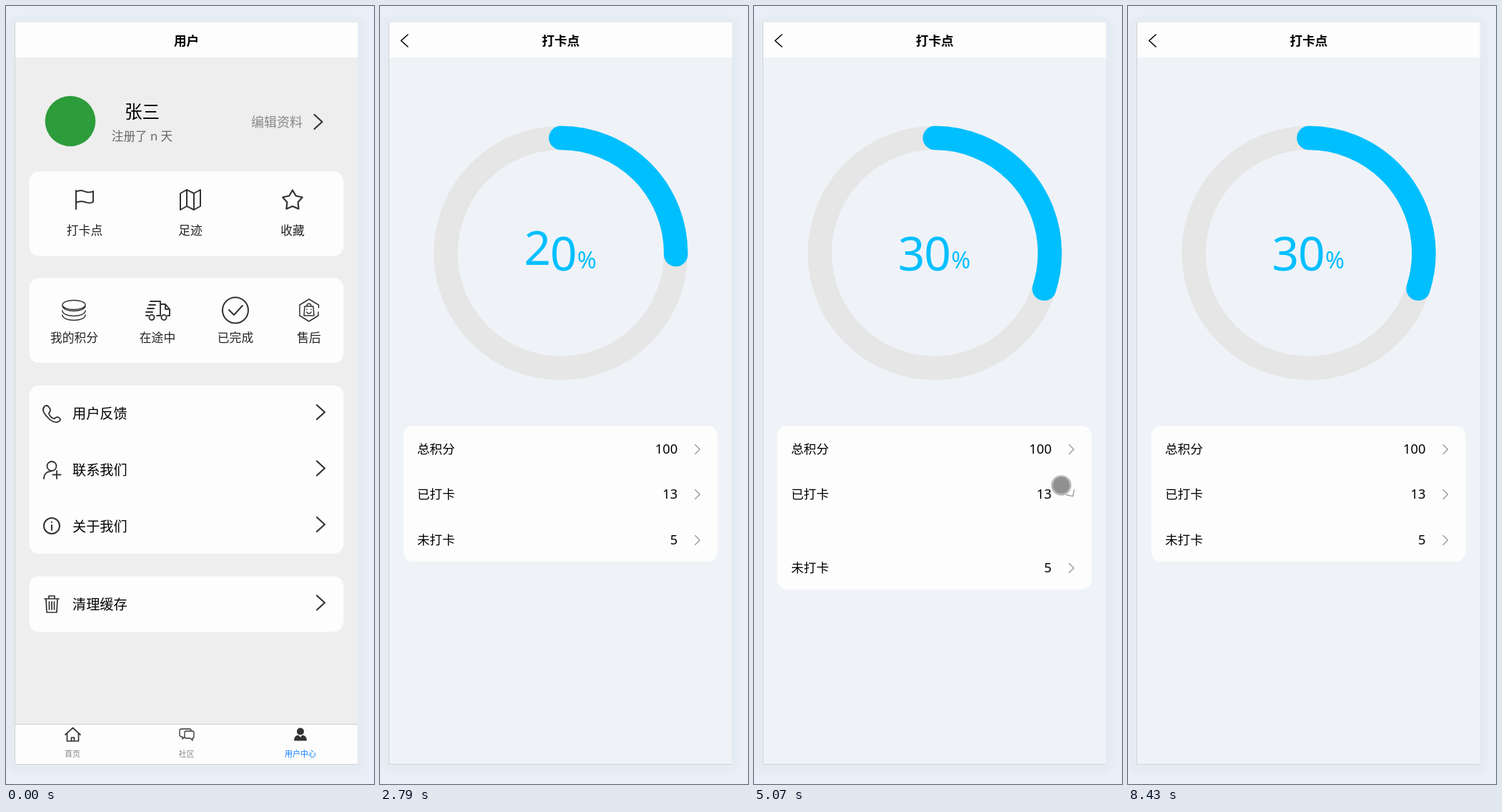
An HTML page that plays this animation: 515x1088 px, repeating every 8880 ms.

```html
<!DOCTYPE html>
<html lang="zh-CN">
<head>
<meta charset="utf-8">
<style>
  html, body { margin: 0; width: 100%; height: 100%; overflow: hidden; background: #e9eff8; }
  svg { display: block; width: 515px; height: 1088px; }
  text { font-family: "Noto Sans", "Noto Sans CJK SC", "Noto Sans CJK", sans-serif; white-space: pre; }
  .icon { fill: none; stroke: #333; stroke-width: 2; stroke-linecap: round; stroke-linejoin: round; }
  .card { fill: #fcfdfc; }
</style>
</head>
<body>
<svg id="stage" viewBox="0 0 515 1088" xmlns="http://www.w3.org/2000/svg"></svg>
<script>
const LOOP = 8880;
const PAGE_SWITCH = 2100;
const COUNT_START = 2190;
const FOLD_TIME = 330;
const DIGIT_PITCH = 64;
const RING_LENGTH = 2 * Math.PI * 161;

// Time, x and y of the touch pointer
const pointerPath = [
  [120, 0, 1031], [300, 200, 675], [500, 317, 572], [790, 317, 572], [920, 317, 590],
  [1320, 317, 590], [1480, 270, 480], [1700, 157, 315], [1800, 131, 305], [2240, 131, 305],
  [2640, 150, 680], [2900, 250, 688], [3110, 435, 665], [3450, 441, 635], [3750, 431, 625],
  [4500, 431, 625], [4780, 430, 670], [5600, 430, 671], [5870, 406, 748], [6100, 406, 754],
  [6860, 406, 754], [6950, 425, 725], [7080, 434, 634], [7410, 428, 1104]
];
const pointerGaps = [[2740, 2840], [6870, 6930]];

const sections = [
  { label: "总积分", value: 100, y: 620, height: 37, open: 3800, close: 4420 },
  { label: "已打卡", value: 13, y: 683, height: 61, open: 4975, close: 5530 },
  { label: "未打卡", value: 5, y: 747, height: 85, open: 6083, close: 6720 }
];

const clamp = v => Math.min(1, Math.max(0, v));
const easeOut = (p, power) => 1 - (1 - clamp(p)) ** power;

// Text placed by the middle of its line
const text = (s, x, y, size, fill = "#000", anchor = "middle", weight = 400) =>
  `<text x="${x}" y="${y + size * .365}" font-size="${size}" fill="${fill}" text-anchor="${anchor}" font-weight="${weight}">${s}</text>`;
const card = (y, h, id = "") => `<rect class="card" id="${id}" x="32.5" y="${y}" width="440" height="${h}" rx="14"/>`;
const icon = (d, width = 2, extra = "") => `<path class="icon" d="${d}" style="stroke-width:${width};${extra}"/>`;
const circle = (x, y, r) => `M${x - r} ${y}a${r} ${r} 0 1 0 ${2 * r} 0a${r} ${r} 0 1 0 ${-2 * r} 0`;
const chevron = y => icon(`M435 ${y - 10}L446 ${y}L435 ${y + 10}`, 2.2);

const polygon = (x, y, points, radius) => "M" + Array.from({ length: points }, (_, i) => {
  const a = i * 2 * Math.PI / points - Math.PI / 2;
  const r = radius(i);
  return `${x + r * Math.cos(a)} ${y + r * Math.sin(a)}`;
}).join("L") + "Z";

const coins = "M79 418a16 6.5 0 1 0 32 0a16 6.5 0 1 0 -32 0"
  + [420, 427, 433].map(y => `M79 ${y - 1}c0 10 32 10 32 0`).join("");

const truck = "M202 413h14v20h-5M216 417h7l6 7v9h-3M216 433h-5M200 418h9M198 423h9M196 428h9M196 433h3M223 418v6h5"
  + circle(204, 435.5, 3.6) + circle(221, 435.5, 3.6);

const phone = "M54 560c3-3 6 0 8 4c1 3-2 4-2 6c1 3 4 6 7 7c2 0 3-3 6-2c4 2 4 4 1 6c-5 3-12-1-16-6c-5-5-8-11-4-15Z";

const userPage = `
  <rect x="13" y="72" width="479" height="932" fill="#eee"/>
  ${text("用户", 252.5, 48.5, 17.6, "#000", "middle", 700)}
  <circle cx="90" cy="161" r="35.3" fill="#2d9c3b"/>
  ${text("张三", 190.5, 148, 24.6)}
  ${text("注册了 n 天", 190.5, 182, 16.6, "#666")}
  ${text("编辑资料", 379, 162, 18, "#888")}
  ${icon("M431.5 152L442.5 162L431.5 172", 2.2)}
  ${card(231.5, 118)}
  ${icon("M98 258V284M98 260c7-4 10-1 14 0s7 1 10-1v15c-5 3-8 1-12 0s-8-1-12 1")}
  ${icon("M244 262l9-5l10 5l9-5v23l-9 5l-10-5l-9 5ZM253 257v23M263 262v23")}
  ${icon(polygon(401, 272, 10, i => i % 2 ? 8 : 14.5), 2.2)}
  ${text("打卡点", 110, 313.5, 16.8, "#222")}
  ${text("足迹", 258, 313.5, 16.8, "#222")}
  ${text("收藏", 401, 313.5, 16.8, "#222")}
  ${card(380.5, 118.5)}
  ${icon(coins, 1.5)}
  ${icon(truck, 1.9)}
  ${icon(circle(321, 425.5, 18) + "M312 425l7 7l12-13", 2)}
  ${icon("M437.500 422v-4l-13.500-8l-13 8v15l13 8l13-8v-5", 1.5)}
  ${icon("M418 420h12l1 13h-14ZM421 420c0-5 6-5 6 0M421 428c1 3 5 3 6 0M421 424v.5M427 424v.5", 1.5)}
  ${text("我的积分", 95.5, 464, 16.8, "#222")}
  ${text("在途中", 212, 464, 16.8, "#222")}
  ${text("已完成", 321, 464, 16.8, "#222")}
  ${text("售后", 424, 464, 16.8, "#222")}
  ${card(530.5, 235.5)}
  ${icon(phone, 1.8)}
  ${icon(circle(64, 643.5, 6.5) + "M53 661c0-6 4-10 10-10.500M71 650v11M65.500 655.500h11", 1.8)}
  ${icon(circle(64, 727, 11) + "M64 726v7M64 721.500v.5", 2)}
  ${card(797.5, 77.5)}
  ${icon("M54 829h20M60 828v-3h8v3M56 829l1 19h14l1-19M60.500 833v11M64 833v11M67.500 833v11", 1.7)}
  ${[["用户反馈", 570, 568], ["联系我们", 648.5, 646.5], ["关于我们", 727.5, 725], ["清理缓存", 837, 834.5]]
    .map(([s, y, arrowY]) => text(s, 93, y, 19.2, "#000", "start") + chevron(arrowY)).join("")}
  <rect class="card" x="13" y="1004" width="479" height="56"/>
  <path d="M13 1004.500H492" stroke="#ccc"/>
  ${icon("M83 1019l10.500-9.500l10.500 9.500M85.500 1017.500v10.500h16v-10.500M91.500 1028v-5h4v5", 1.7)}
  ${icon("M246 1011h11q2 0 2 2v0M250 1022l-3 3v-3q-4 0-4-3v-6q0-2 3-2M252 1014h9q2 0 2 2v6q0 2-2 2v3l-3-3h-6q-2 0-2-2v-6q0-2 2-2", 1.3)}
  <circle cx="412" cy="1014.500" r="5" fill="#333"/>
  <path d="M403 1027.500q0-7 6-8l3 3l3-3q6 1 6 8Z" fill="#333"/>
  ${text("首页", 93, 1046, 11, "#888")}
  ${text("社区", 252.500, 1046, 11, "#888")}
  ${text("用户中心", 412, 1046, 11, "#1580ff")}`;

const digit = (n, x, y) => `<text x="${x}" y="${y}" font-size="66" text-anchor="middle">${n}</text>`;

const pointsPage = `
  <rect x="13" y="72" width="479" height="988" fill="#eff3f8"/>
  ${text("打卡点", 253, 48.5, 17.6, "#000", "middle", 700)}
  ${icon("M39 40L29.500 48.500L39 57", 1.6, "stroke:#000")}
  <g fill="none" stroke-width="33.5">
    <circle cx="253" cy="345.5" r="161" stroke="#e6e6e6"/>
    <circle id="ring" cx="253" cy="345.5" r="161" stroke="#00bfff" stroke-linecap="round" transform="rotate(-90 253 345.5)"/>
  </g>
  <g fill="#00bfff">
    <g clip-path="url(#digits)"><g id="tens">${[0, 1, 2, 3].map(n => digit(n, 220.5, 370 + n * DIGIT_PITCH)).join("")}</g></g>
    ${digit(0, 257, 370)}
    <text x="276" y="367" font-size="32.500">%</text>
  </g>
  ${card(587, 190, "list")}
  ${sections.map((s, i) => `<g id="row${i}">
    ${text(s.label, 52, s.y, 17.6, "#000", "start")}
    ${text(s.value, 416.5, s.y - .5, 18.4, "#000", "end")}
    <path id="arrow${i}" class="icon" d="M441 ${s.y - 6.5}l6.500 6.500l-6.500 6.500" style="stroke:#999;stroke-width:1.3"/>
  </g>`).join("")}`;

document.getElementById("stage").innerHTML = `
  <defs>
    <clipPath id="digits"><rect x="195" y="313" width="81" height="64"/></clipPath>
    <filter id="soft"><feGaussianBlur stdDeviation="2"/></filter>
  </defs>
  <rect width="515" height="1088" fill="#e9eff8"/>
  <rect x="1" y="14" width="502" height="1058" rx="16" fill="#e5ebf2" filter="url(#soft)"/>
  <rect class="card" x="13" y="23" width="479.500" height="49.500"/>
  <g id="user">${userPage}</g>
  <g id="points">${pointsPage}</g>
  <path d="M12.500 23V1060.500H492" fill="none" stroke="#d0d4d8"/>
  <g id="pointer">
    <circle r="12.8" fill="none" stroke="#000" stroke-opacity=".27" stroke-width="2.8"/>
    <circle r="11.500" fill-opacity=".43"/>
  </g>`;

const el = id => document.getElementById(id);
const show = (id, visible) => el(id).setAttribute("display", visible ? "inline" : "none");
const move = (id, x, y) => el(id).setAttribute("transform", `translate(${x} ${y})`);

function drawPointer(t) {
  const next = pointerPath.findIndex(p => p[0] > t);
  const visible = next > 0 && !pointerGaps.some(([from, to]) => t >= from && t < to);
  show("pointer", visible);
  if (!visible) return;
  const [t0, x0, y0] = pointerPath[next - 1];
  const [t1, x1, y1] = pointerPath[next];
  const p = (t - t0) / (t1 - t0);
  move("pointer", x0 + (x1 - x0) * p, y0 + (y1 - y0) * p);
}

function drawSections(t) {
  let offset = 0;
  sections.forEach((s, i) => {
    const opened = easeOut((t - s.open) / FOLD_TIME, 3) - easeOut((t - s.close) / FOLD_TIME, 3);
    move("row" + i, 0, offset);
    el("arrow" + i).setAttribute("transform", `rotate(${90 * opened} 444.5 ${s.y})`);
    offset += s.height * opened;
  });
  el("list").setAttribute("height", 190 + offset);
}

function drawCounter(t) {
  const filled = .3 * easeOut((t - COUNT_START) / 1000, 2) * RING_LENGTH;
  el("ring").setAttribute("stroke-dasharray", `${filled} ${RING_LENGTH}`);
  move("tens", 0, -3 * DIGIT_PITCH * easeOut((t - COUNT_START) / 1300, 2));
}

function draw(now) {
  const t = now % LOOP;
  show("user", t < PAGE_SWITCH);
  show("points", t >= PAGE_SWITCH);
  drawCounter(t);
  drawSections(t);
  drawPointer(t);
}

let start;
function frame(now) {
  start ??= now;
  draw(now - start);
  requestAnimationFrame(frame);
}
draw(0);
requestAnimationFrame(frame);
</script>
</body>
</html>
```
